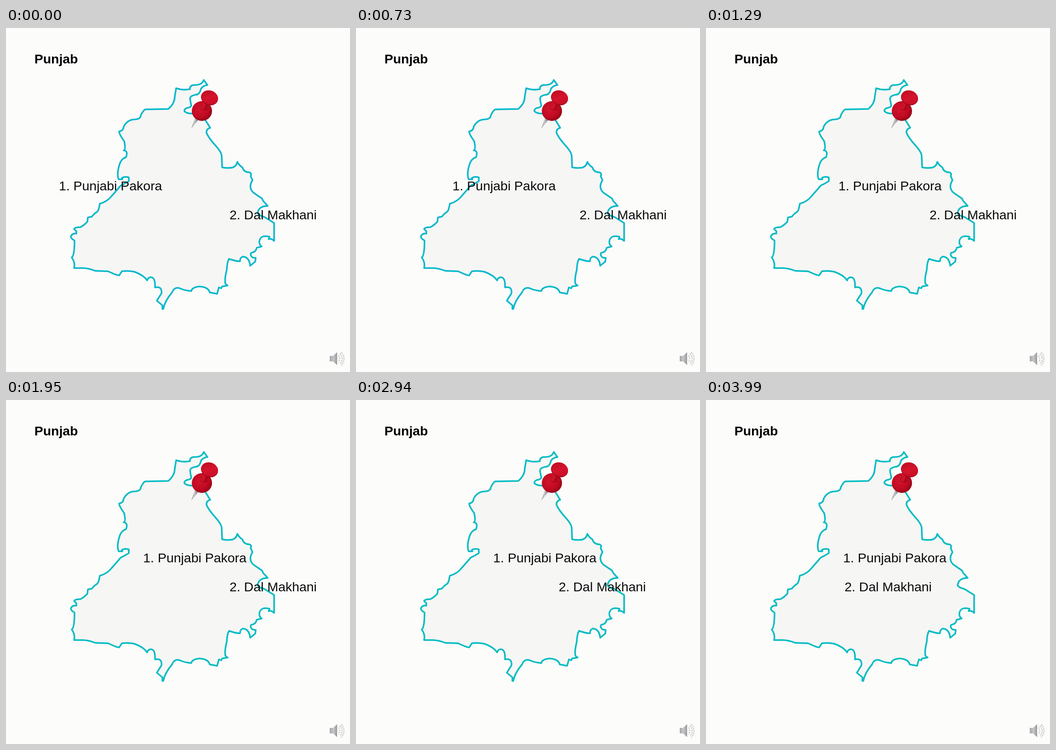
Recreate the animation shown at these times as an HTML page. Size 748x748 px, loop 4.02 s.

```html
<!DOCTYPE html>
<html lang="en">
<head>
<meta charset="utf-8">
<title>Punjab dishes</title>
<style>
  html, body { margin: 0; width: 100%; height: 100%; overflow: hidden; background: #fcfcfb; }
  svg { display: block; width: 100vw; height: 100vh; }
  text { font: 28.45px "Liberation Sans", Arial, sans-serif; fill: #0a0a0a; }
  .title { font-weight: bold; fill: #000; }
  #map { fill: #f6f6f5; stroke: #08b8cb; stroke-width: 3.5; stroke-linejoin: round; }
  .waves { fill: none; stroke: #cfcfcc; stroke-width: 2.8; stroke-dasharray: 3.2 1.8; }
</style>
</head>
<body>
<svg viewBox="0 0 748 748">
  <defs>
    <radialGradient id="ball" cx=".4" cy=".4" r=".68">
      <stop offset="0" stop-color="#d0142c"/>
      <stop offset=".6" stop-color="#c20a22"/>
      <stop offset="1" stop-color="#8a0414"/>
    </radialGradient>
    <linearGradient id="cap" x2="1" y2="1">
      <stop offset="0" stop-color="#b80a20"/>
      <stop offset=".5" stop-color="#d4142c"/>
      <stop offset="1" stop-color="#c20a22"/>
    </linearGradient>
    <linearGradient id="steel">
      <stop offset="0" stop-color="#a0a0a4"/>
      <stop offset=".5" stop-color="#c4c4c8"/>
      <stop offset="1" stop-color="#77777c"/>
    </linearGradient>
    <linearGradient id="cone">
      <stop offset="0" stop-color="#a4a4a6"/>
      <stop offset=".5" stop-color="#c8c8ca"/>
      <stop offset="1" stop-color="#98989a"/>
    </linearGradient>
  </defs>

  <path id="map"/>

  <g id="pin">
    <path d="M411 196L418 200L402.500 219Z" fill="url(#steel)"/>
    <ellipse cx="426" cy="180.500" rx="22" ry="21.500" fill="url(#ball)"/>
    <path d="M427 159Q428 170 421 175Q430 182 438 178Q437 170 443 165Z" fill="#ae081c"/>
    <path d="M427 159Q428 170 422 175L430 177L435 164Z" fill="#cc142a"/>
    <ellipse cx="442.500" cy="152" rx="19" ry="15.500" transform="rotate(22 442.500 152)" fill="#a00518"/>
    <ellipse cx="443" cy="151" rx="18.500" ry="15" transform="rotate(22 443 151)" fill="url(#cap)"/>
  </g>

  <g id="speaker">
    <path d="M704 713H711L720 705V733L711 725H704Z" fill="url(#cone)"/>
    <path class="waves" d="M723 712Q728 719 723 727M726 708Q736 719 726 731M729 705Q741 719 729 734"/>
  </g>

  <text class="title" x="61.700" y="77">Punjab</text>
  <text id="first" y="352.500">1. Punjabi Pakora</text>
  <text id="second" y="415.500">2. Dal Makhani</text>
</svg>
<script>
const LOOP = 4020, SLIDE = 1750;

// Borders, clockwise from the northern tip
const northEast = `M430 113L438 124Q429 125 424 132Q421 145 413 145Q401 147 400 153
  Q401 160 403 169Q401 173 393 174Q387 177 388 181Q393 186 404 186L432 198Q438 207 444 217
  Q435 220 436 228Q440 238 455 255Q469 270 469 279L470 303Q478 305 487 304Q500 304 503 291
  Q507 299 514 303Q517 314 530 314Q535 317 532 322L536 331Q526 347 538 358L557 371Q559 377 562 379`;
const southEast = `L569 387Q549 387 547 403Q550 408 562 411L583 424L583 463Q577 457 571 459L573 454
  Q554 449 551 463Q550 471 556 475L545 478Q544 487 533 489Q530 493 536 499L543 500L542 508L531 517
  Q529 498 515 497Q508 500 509 507Q502 508 485 502Q481 508 480 526Q475 545 477 556L482 560
  L470 562L468 566L463 564L459 578L443 575`;
const south = `Q440 563 420 562Q404 564 403 572Q389 571 378 566Q366 562 361 575Q345 594 342 611H340V603
  L328 593L338 577Q340 561 324 564Q325 541 314 542Q308 543 307 549Q299 537 279 530Q265 527 252 529
  L246 538Q241 538 222 529L194 528Q179 522 166 522H148`;
const west = `Q151 510 143 499Q149 495 149 462Q141 458 141 453Q144 446 153 447L153 442L148 437Q150 433 162 433
  Q171 428 177 421L178 412L187 410Q190 405 199 399Q202 395 204 382Q220 378 230 365L245 348Q250 341 255 340
  L267 333V325Q259 322 252 326L253 329H245Q240 318 247 296Q251 284 261 281Q266 267 256 266
  Q261 264 257 246Q246 231 246 225Q255 224 256 214Q263 201 276 199Q293 199 293 190
  Q299 178 303 177L353 176Q367 164 367 149L370 131Q384 136 400 133Q399 126 407 124Q426 125 430 113Z`;

const byId = id => document.getElementById(id);
const map = byId("map");
map.setAttribute("d", northEast + southEast + south + west);

// Half of the time speeding up, half slowing down
function slide(time, start, from, to) {
  const u = Math.min(1, Math.max(0, (time - start) / SLIDE));
  const eased = u < 0.5 ? 2 * u * u : 1 - 2 * (1 - u) ** 2;
  return from + (to - from) * eased;
}

function draw(now) {
  const time = now % LOOP;
  byId("first").setAttribute("x", slide(time, -167, 111.5, 298.3));
  byId("second").setAttribute("x", slide(time, 2330, 486, 300.3));
  map.style.stroke = time < 1090 ? "#08b8cb" : "#06bcc3";
  requestAnimationFrame(draw);
}
draw(0);
</script>
</body>
</html>
```
